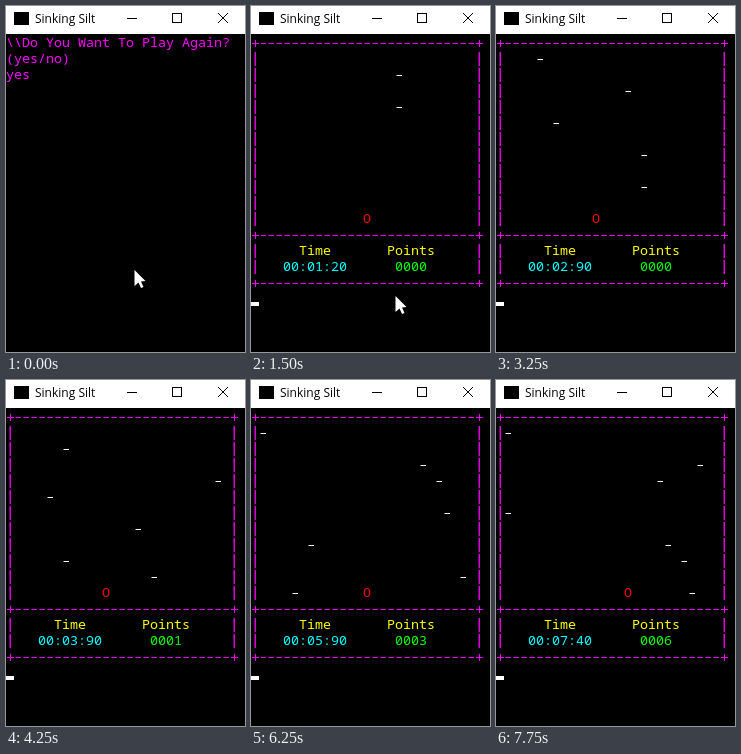
Write an HTML page with a canvas that moves like this. It is 239 px wide and 346 px high and loops after 8000 ms.

```html
<!DOCTYPE html>
<html lang="en">
<head>
<meta charset="utf-8">
<title>Sinking Silt</title>
<style>
  html, body { margin: 0; width: 100%; height: 100%; overflow: hidden; background: #000; }
  canvas { display: block; width: 239px; height: 346px; }
</style>
</head>
<body>
<canvas id="stage" width="239" height="346"></canvas>
<script>
const ctx = document.getElementById('stage').getContext('2d', { alpha: false });
const LOOP = 8000, TICK = 250;
const CELL_W = 8, CELL_H = 16, TOP = 29;
const FALL = 0.3, SPAWN_DELAY = 0.15, FLOOR_ROW = 12, RIGHT = 28;
const MAGENTA = '#f0f', WALL = '#d0d';
const MONO = '13.333px "Noto Sans Mono", "DejaVu Sans Mono", monospace';

// Fall step at which each grain appears, and its column
const SPAWNS = [
  [1, 18], [3, 18], [5, 7], [7, 16], [9, 5], [10, 26], [12, 7],
  [14, 24], [16, 23], [17, 21], [19, 1], [21, 20], [22, 25], [24, 1]
];
// Start time in ms and player column
const MOVES = [[0, 14], [3250, 12], [6250, 14], [7500, 16]];

const rowTop = row => TOP + row * CELL_H;

function rect(x, y, w, h, color) {
  ctx.fillStyle = color;
  ctx.fillRect(x, y, w, h);
}

function text(str, col, row, color) {
  ctx.font = MONO;
  ctx.fillStyle = color;
  ctx.fillText(str, col * CELL_W, rowTop(row) + 12);
}

function dash(col, row, color) {
  rect(col * CELL_W + 1.5, rowTop(row) + 8, 5.5, 1, color);
}

function line(points, color) {
  ctx.strokeStyle = color;
  ctx.lineWidth = 1;
  ctx.beginPath();
  points.forEach(([x, y], i) => i ? ctx.lineTo(x, y) : ctx.moveTo(x, y));
  ctx.stroke();
}

function titleBar() {
  rect(0, 0, 239, 28, '#fff');
  rect(8, 6, 15, 13, '#000');
  ctx.font = '12px "Open Sans", "Noto Sans", sans-serif';
  ctx.fillStyle = '#000';
  ctx.fillText('Sinking Silt', 29, 17);
  rect(121, 12, 10, 1, '#000');
  ctx.strokeStyle = '#000';
  ctx.lineWidth = 1;
  ctx.strokeRect(166.5, 7.5, 9, 9);
  line([[212, 7], [222, 17]], '#000');
  line([[222, 7], [212, 17]], '#000');
}

function prompt() {
  ['\\\\Do You Want To Play Again?', '(yes/no)', 'yes']
    .forEach((str, row) => text(str, 0, row, MAGENTA));
}

function board() {
  for (let row = 0; row <= 15; row++) {
    const isRail = row === 0 || row === FLOOR_ROW || row === 15;
    const y = rowTop(row);
    for (const x of [0, RIGHT * CELL_W]) {
      if (isRail) {
        rect(x + 1, y + 8, 7, 1, MAGENTA);
        rect(x + 4, y + 5, 1, 7, MAGENTA);
      } else {
        rect(x + 3.5, y + 1, 1.5, 14, WALL);
      }
    }
    if (isRail) for (let col = 1; col < RIGHT; col++) dash(col, row, MAGENTA);
  }
}

// Removing a grain mid-pass makes the one behind it miss that step.
function simulate(clock) {
  const grains = [], last = Math.floor(clock / FALL);
  let points = 0;
  for (let step = 0; step <= last; step++) {
    for (let i = 0; i < grains.length; i++) {
      if (++grains[i].row > FLOOR_ROW) {
        grains.splice(i, 1);
        points++;
      }
    }
    for (const [start, col] of SPAWNS) {
      if (start === step && clock >= step * FALL + SPAWN_DELAY) grains.push({ col, row: 1 });
    }
  }
  return { grains, points };
}

function game(ms) {
  const clock = Math.max(0, ms / 1000 * 0.995 - 0.234);
  const { grains, points } = simulate(clock);
  const tenths = Math.floor(clock * 10);
  const seconds = String(Math.floor(tenths / 10)).padStart(2, '0');
  board();
  for (const { col, row } of grains) if (row < FLOOR_ROW) dash(col, row, '#fff');
  text('O', MOVES.filter(([start]) => ms >= start).pop()[1], 11, '#f00');
  text('Time', 6, 13, '#ff0');
  text('Points', 17, 13, '#ff0');
  text(`00:${seconds}:${tenths % 10}0`, 4, 14, '#0ff');
  text(String(points).padStart(4, '0'), 18, 14, '#0f0');
  rect(0, 296, 8, 4, '#fff');
}

function pointer(ms) {
  if (ms >= 2000) return;
  const away = Math.max(0, ms - 1250) / 250;
  ctx.save();
  ctx.translate(128.5 + away * 16, 264 + away * 26);
  ctx.beginPath();
  for (const [x, y] of [[0, 0], [0, 16], [4, 12.5], [6.5, 18], [9, 17], [6.5, 11.5], [11, 11]]) {
    ctx.lineTo(x, y);
  }
  ctx.closePath();
  ctx.fillStyle = '#fff';
  ctx.fill();
  ctx.restore();
}

function draw(now) {
  const ms = Math.floor(now % LOOP / TICK) * TICK;
  rect(0, 0, 239, 346, '#000');
  titleBar();
  if (ms < TICK) prompt(); else game(ms);
  pointer(ms);
}

let origin;
function frame(now) {
  origin ??= now;
  draw(now - origin);
  requestAnimationFrame(frame);
}
draw(0);
requestAnimationFrame(frame);
</script>
</body>
</html>
```
